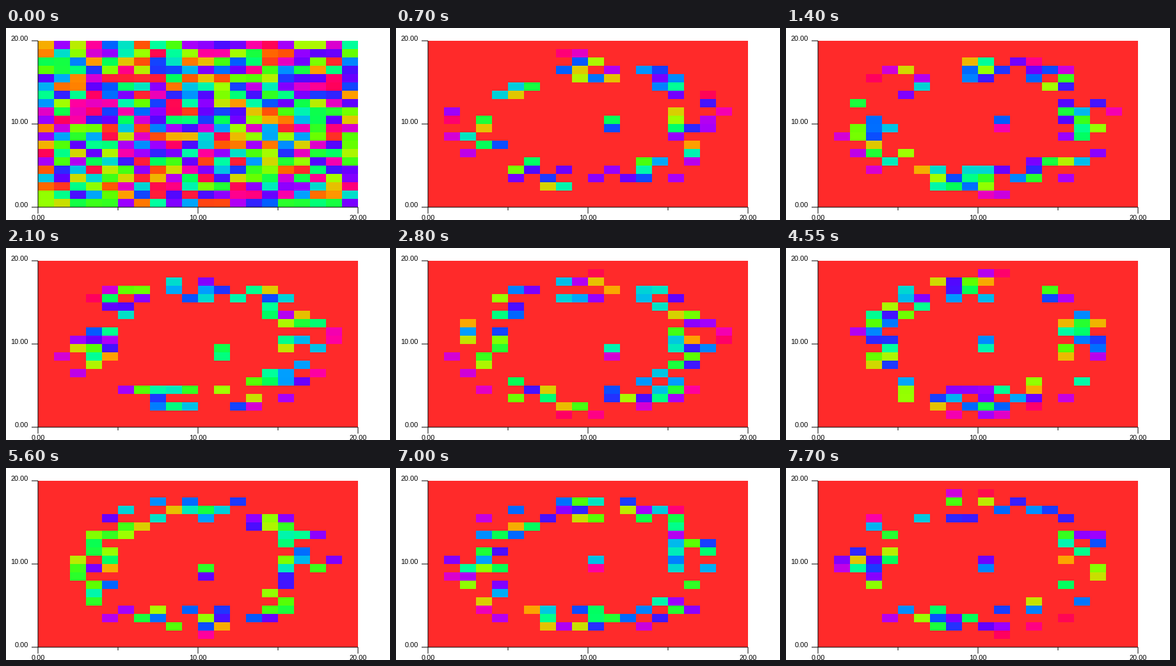
Animation of 600 by 300 pixels, one loop 8000 ms. Source, as a matplotlib script:

```python
import numpy as np
import matplotlib.pyplot as plt
from matplotlib.animation import FuncAnimation

W, H, DPI = 600, 300, 100
N = 20
STEPS, STEP_MS, TICK_MS, LOOP_MS = 23, 350, 50, 8000
LEFT, RIGHT, TOP, BOTTOM = 50, 550, 20, 280
PT = 72 / DPI  # one pixel in points

rng = np.random.default_rng(12)
rows, cols = np.mgrid[:N, :N]
radius = np.hypot(cols - 9.5, rows - 9.5)
rim = (radius > 8.2) & (radius < 8.7)
band = (radius > 5.4) & (radius <= 8.2)

# Each cell of the ring keeps its own tendency to light up
chance = np.where(band, rng.uniform(0.1, 0.8, (N, N)), 0)
chance = np.where(rim, rng.uniform(0, 0.6, (N, N)), chance)


def rainbow(hue):
    """Cosine rainbow with clipped channels; hue in degrees."""
    shift = np.array([0, 120, 240])
    wave = np.cos(np.radians(hue[..., None] - shift))
    return np.clip(0.5 + wave * 2 / 3, 0, 1)


def random_hues(low=0, high=360):
    return rng.uniform(low, high, (N, N))


def ring_hues():
    """Any hue inside the ring, magenta to pink on its rim, red elsewhere."""
    hue = np.where(rim, random_hues(270, 350), random_hues(40, 290))
    return np.where(rng.random((N, N)) < chance, hue, 0)


def build_steps():
    settling = np.where(rng.random((N, N)) < 0.5, 0, random_hues())
    grids = [random_hues(), settling]
    ring = ring_hues()
    for step in range(2, STEPS):
        renew = rng.random((N, N)) < np.where(rim, 0.5, 0.85)
        ring = np.where(renew, ring_hues(), ring)
        grid = ring.copy()
        # A pair of cells wanders around the middle
        x = 11 - step // 12
        for y in (9, 8 + 2 * rng.integers(2)):
            grid[y, x] = rng.uniform(80, 320)
        grids.append(grid)
    return [rainbow(g) for g in grids]


images = build_steps()

fig = plt.figure(figsize=(W / DPI, H / DPI), dpi=DPI, facecolor="white")
ax = fig.add_axes([0, 0, 1, 1])
ax.axis("off")
heat = ax.imshow(images[0], origin="lower", interpolation="nearest",
                 extent=(LEFT, RIGHT, BOTTOM, TOP), aspect="auto")
ax.set_xlim(0, W)
ax.set_ylim(H, 0)


def line(x0, y0, x1, y1):
    ax.plot([x0, x1], [y0, y1], color="black", lw=PT, snap=False,
            solid_capstyle="butt")


def label(x, y, value, align):
    ax.text(x, y, f"{value:.2f}", ha=align, va="baseline", color="black",
            family="Liberation Sans", fontsize=11 * PT)


line(LEFT, TOP, LEFT, BOTTOM)
line(LEFT, BOTTOM, RIGHT, BOTTOM)
for value in range(0, N + 1, 5):
    x = LEFT + value * (RIGHT - LEFT) / N
    y = BOTTOM - value * (BOTTOM - TOP) / N
    major = value % 10 == 0
    line(x, BOTTOM, x, BOTTOM + (10 if major else 5))
    if major:
        line(LEFT - 10, y, LEFT, y)
        label(x, 300, value, "center")
        label(35, y, value, "right")


def update(i):
    step = min(i * TICK_MS // STEP_MS, STEPS - 1)
    heat.set_data(images[step])
    return [heat]


anim = FuncAnimation(fig, update, frames=LOOP_MS // TICK_MS, interval=TICK_MS,
                     repeat=True, repeat_delay=0, blit=False)
plt.show()
```
